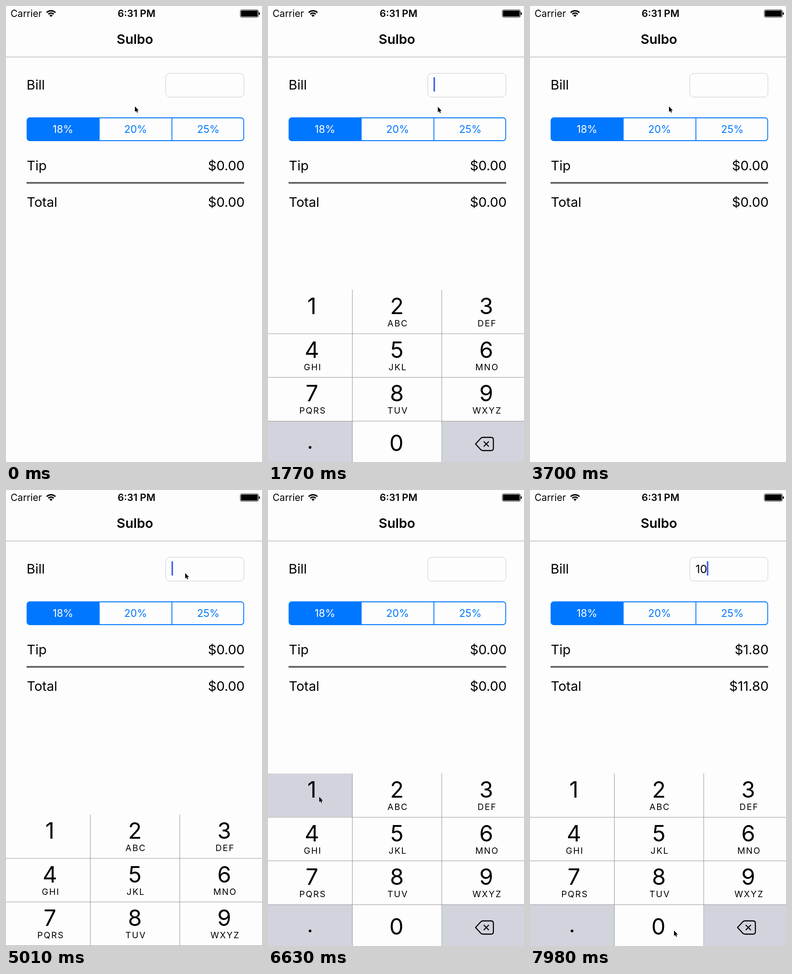
These frames come from a looping animation (560 px wide and 999 px high, 8000 ms). An HTML page:

```html
<!DOCTYPE html>
<html lang="en">
<head>
<meta charset="utf-8">
<title>Tip calculator</title>
<style>
  html, body { margin: 0; width: 100%; height: 100%; overflow: hidden; background: #fdfdfd; }
  svg { display: block; width: 100vw; height: 100vh; }
  text { font: 29px Inter, sans-serif; }
  .status { font-size: 21px; }
  .clock { font-size: 21.5px; font-weight: 600; }
  .title { font-weight: 600; }
  .mid { text-anchor: middle; }
  .end { text-anchor: end; }
  .seg { font-size: 22.5px; }
  .field { font-size: 24.5px; }
  .digit { font-size: 49px; }
  .letters { font-size: 19px; letter-spacing: 2px; }
</style>
</head>
<body>
<svg viewBox="0 0 560 999">
  <rect width="560" height="999" fill="#fdfdfd"/>

  <!-- status and title bars -->
  <text class="status" x="10" y="24">Carrier</text>
  <g fill="none" stroke="#000" stroke-width="3">
    <path d="M88.9 14.4A13.5 13.5 0 0 1 108.1 14.4M92.5 18A8.5 8.5 0 0 1 104.5 18"/>
    <path d="M98.5 24L95 20.5A5 5 0 0 1 102 20.5Z" fill="#000" stroke="none"/>
  </g>
  <text class="clock mid" x="285.5" y="24">6:31 PM</text>
  <rect x="512.5" y="8.5" width="39.5" height="16" rx="3" fill="none" stroke="#000"/>
  <rect x="514" y="10" width="36.5" height="13" rx="1.5"/>
  <path d="M553 13.5Q555.5 14 555.5 16.5T553 19.5Z"/>
  <text class="title mid" x="282" y="83">Sulbo</text>
  <rect y="111" width="560" height="1.3" fill="#b2b2b4"/>

  <!-- form -->
  <text x="45" y="183">Bill</text>
  <rect x="349.5" y="147.5" width="171" height="52" rx="8.5" fill="#fdfdfd" stroke="#cbcbcd"/>
  <text id="bill" class="field" x="362" y="182"></text>
  <rect id="caret" y="156" width="3.4" height="31.5" rx="1" fill="#4263eb"/>
  <rect x="46" y="245" width="474" height="50" rx="6" fill="none" stroke="#0077ff" stroke-width="1.8"/>
  <path d="M204 245H52Q46 245 46 251V289Q46 295 52 295H204Z" fill="#0077ff"/>
  <g id="rates"></g>
  <text x="45.5" y="360">Tip</text>
  <text id="tip" class="end" x="522" y="360"></text>
  <rect x="45" y="385.7" width="476" height="3.5" fill="#565658"/>
  <text x="45.5" y="440">Total</text>
  <text id="total" class="end" x="522" y="440"></text>

  <!-- keypad -->
  <g id="pad">
    <rect y="621" width="560" height="378" fill="#fdfdfd"/>
    <path d="M0 909H184V999H0ZM381 909H560V999H381Z" fill="#d1d4dc"/>
    <rect id="press" height="95" fill="#d1d4dc"/>
    <path d="M184.5 621V999M380 621V999M0 717H560M0 812.5H560M0 908.5H560" stroke="#98989a" stroke-width="1.1"/>
    <g id="keys"></g>
    <circle cx="92" cy="966" r="3"/>
    <g fill="none" stroke="#000" stroke-width="2.3" stroke-linejoin="round" stroke-linecap="round">
      <path d="M454 958.5L465 946.5Q467 944 470 944H488Q493 944 493 949V968Q493 973 488 973H470Q467 973 465 970.5Z"/>
      <path d="M472.500 953.500l10 10m0-10l-10 10"/>
    </g>
  </g>

  <path id="cursor" d="M0 0V12L2.700 9.500L4.500 13.700L6.400 12.800L4.800 8.800H8.300Z" stroke="#fff" paint-order="stroke"/>
</svg>
<script>
const $ = id => document.getElementById(id);
const set = (id, attrs) => {
  for (const name in attrs) $(id).setAttribute(name, attrs[name]);
};

// the screen refreshes once per STEP; the events below are counted in steps
const STEP = 147.5, LOOP = 8000, PAD_HEIGHT = 378;
const OPEN = 9, CLOSE = 23, REOPEN = 33, ONE = 47, TEN = 53;

// where the pointer rests: arrival step, leaving step, x, y
const rests = [
  [0, 0, 282, 220], [2, 2, 269, 268], [6, 11, 393, 183], [17, 19, 264, 410],
  [20, 20, 305, 337], [22, 27, 304, 220], [32, 35, 392, 182],
  [38, 38, 350, 393], [44, 48, 112, 672], [51, 60, 315, 965]
];

$('rates').innerHTML = [18, 20, 25].map((rate, i) => {
  const x = 124.5 + 159 * i;
  return `<text class="seg mid" x="${x}" y="278" fill="${i ? '#0077ff' : '#fff'}">${rate}%</text>` +
    (i ? `<rect x="${x - 80.5}" y="245" width="1.8" height="50" fill="#0077ff"/>` : '');
}).join('');

const digit = (n, x, y) => `<text class="digit mid" x="${x}" y="${y}">${n}</text>`;
const letters = ' ABC DEF GHI JKL MNO PQRS TUV WXYZ'.split(' ');
$('keys').innerHTML = letters.map((word, i) => {
  const x = 96 + 190.7 * (i % 3) - (i % 3 === 1 ? 4.7 : 0);
  const y = 674 + 95.6 * Math.floor(i / 3);
  return digit(i + 1, x, y) +
    `<text class="letters mid" x="${x + 2}" y="${y + 27}">${word}</text>`;
}).join('') + digit(0, 281, 974);

function pointer(k) {
  const i = rests.findIndex(rest => k <= rest[1]);
  const [arrive, , x, y] = rests[i];
  if (k >= arrive) return [x, y];
  const [, leave, fromX, fromY] = rests[i - 1];
  const f = (k - leave) / (arrive - leave);
  return [fromX + (x - fromX) * f, fromY + (y - fromY) * f];
}

// critically damped spring: share of the way still to go
function remaining(steps) {
  const s = Math.max(0, steps) * STEP / 1000 * 18.7;
  return (1 + s) * Math.exp(-s);
}

function padOffset(k) {
  if (k >= REOPEN) return PAD_HEIGHT * remaining(k - REOPEN);
  if (k >= CLOSE + 2) return PAD_HEIGHT;
  if (k >= CLOSE) return PAD_HEIGHT * (1 - remaining(k - CLOSE));
  return PAD_HEIGHT * remaining(k - OPEN);
}

function caretOpacity(k) {
  if (k < OPEN || (k >= CLOSE && k < REOPEN)) return 0;
  const since = [TEN, ONE, REOPEN, OPEN].find(start => k >= start);
  const phase = (k - since) * STEP / 1000 % 1;
  const level = phase < 0.8 ? (0.67 - phase) / 0.19 : (phase - 0.84) / 0.14;
  return Math.max(0, Math.min(1, level));
}

function draw() {
  const t = performance.now() % LOOP;
  const k = Math.floor((t + 14) / STEP);
  const bill = k >= TEN ? '10' : k >= ONE ? '1' : '';
  const tip = bill * 0.18;
  $('bill').textContent = bill;
  $('tip').textContent = '$' + tip.toFixed(2);
  $('total').textContent = '$' + (+bill + tip).toFixed(2);

  const onOne = k >= ONE - 2 && k < ONE, onZero = k === TEN - 1;
  set('press', {
    x: onZero ? 185 : 0, y: onZero ? 909 : 621, width: onOne ? 184 : onZero ? 195 : 0
  });
  set('caret', { x: [362, 371.5, 386.8][bill.length], opacity: caretOpacity(k) });
  set('pad', { transform: `translate(0 ${Math.round(padOffset(k))})` });
  set('cursor', { transform: `translate(${pointer(k)})` });
  requestAnimationFrame(draw);
}
draw();
</script>
</body>
</html>
```
